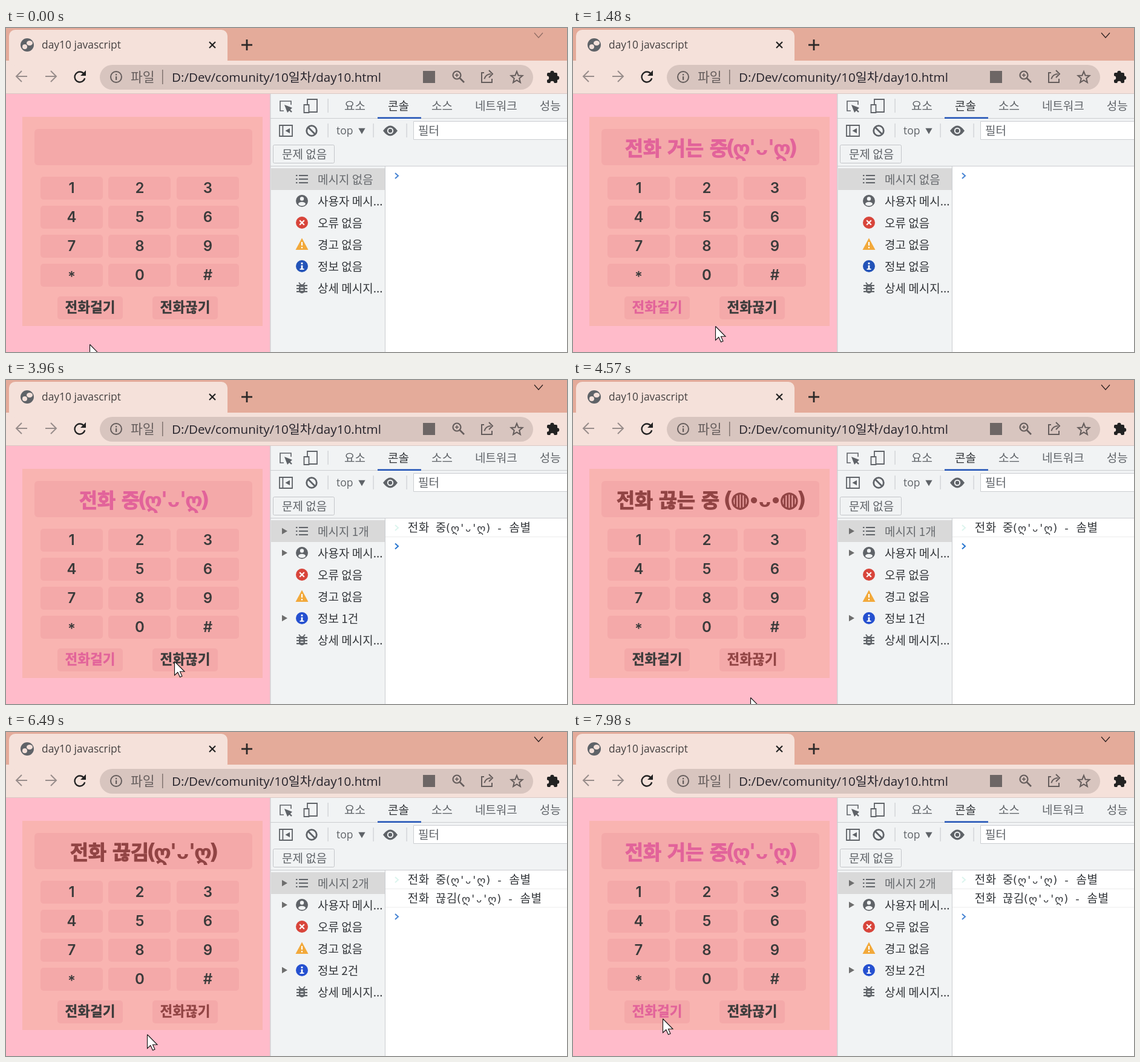
An HTML page with a canvas that plays this animation: 927 by 536 pixels, repeating every 8 s.

```html
<!DOCTYPE html>
<html lang="ko">
<head>
<meta charset="utf-8">
<title>day10 javascript</title>
<style>
html, body { margin: 0; width: 100%; height: 100%; overflow: hidden; background: #ffbbca; }
canvas { display: block; }
</style>
</head>
<body>
<canvas id="stage" width="927" height="536"></canvas>
<script>
const c = document.getElementById('stage').getContext('2d');
const LOOP = 8000, STEP = 70, TAU = Math.PI * 2;
const KR = '"Noto Sans CJK KR", "Noto Sans CJK", sans-serif';
const UI = '"Open Sans", ' + KR;
const SYMBOL = '"DejaVu Sans", sans-serif';
const BAR = '#f5e1da', PANEL = '#f1f3f4', RULE = '#cbcdd1', PAD = '#f4a9a9';
const GREY = '#5f6368', SOFT = '#655d5c', INK = '#33363a', KEY = '#3b3b3b';
const PINK = '#e2639a', RED = '#914444';

// Timeline in ms
const PRESS_CALL = 490, PRESS_END = 4030, PRESS_AGAIN = 7850;
const LOG_TIMES = [2540, 6110];
const LOGS = ["전화 중(ღ'ᴗ'ღ) - 솜별", "전화 끊김(ღ'ᴗ'ღ) - 솜별"];
const SCREENS = [
  { at: 540, color: PINK, text: "전화 거는 중(ღ'ᴗ'ღ)" },
  { at: 2540, color: PINK, text: "전화 중(ღ'ᴗ'ღ)" },
  { at: 4100, color: RED, text: '전화 끊는 중 (◍•ᴗ•◍)' },
  { at: 6110, color: RED, text: "전화 끊김(ღ'ᴗ'ღ)" },
  { at: 7910, color: PINK, text: "전화 거는 중(ღ'ᴗ'ღ)" }
];
const MOVES = [
  { from: 70, to: 210, x: 134, y: 449 },
  { from: 1340, to: 1480, x: 235, y: 493 },
  { from: 3290, to: 4030, x: 285, y: 461 },
  { from: 4100, to: 4290, x: 294, y: 525 },
  { from: 4570, to: 5250, x: 281, y: 527 },
  { from: 5450, to: 5930, x: 263, y: 511 },
  { from: 6000, to: 6490, x: 233, y: 500 },
  { from: 6960, to: 7230, x: 155, y: 484 },
  { from: 7300, to: 7980, x: 147, y: 473 }
];

function box(x, y, w, h, color, r = 0) {
  c.fillStyle = color;
  c.beginPath();
  c.roundRect(x, y, w, h, r);
  c.fill();
}

function frame(x, y, w, h, color, lw = 1, r = 0) {
  c.strokeStyle = color;
  c.lineWidth = lw;
  c.beginPath();
  c.roundRect(x, y, w, h, r);
  c.stroke();
}

function trace(p) {
  c.beginPath();
  for (let i = 0; i < p.length; i += 2) c.lineTo(p[i], p[i + 1]);
}

function line(color, lw, ...p) {
  trace(p);
  c.strokeStyle = color;
  c.lineWidth = lw;
  c.stroke();
}

function poly(color, ...p) {
  trace(p);
  c.closePath();
  c.fillStyle = color;
  c.fill();
}

function disc(x, y, r, color, ry = r) {
  c.beginPath();
  c.ellipse(x, y, r, ry, 0, 0, TAU);
  c.fillStyle = color;
  c.fill();
}

function ring(x, y, r, color, lw, from = 0, to = TAU) {
  c.beginPath();
  c.arc(x, y, r, from, to);
  c.strokeStyle = color;
  c.lineWidth = lw;
  c.stroke();
}

// Open angle with its tip at x, y
function angle(x, y, dx, dy, color, lw) {
  line(color, lw, x - dx, y - dy, x, y, x - dx, y + dy);
}

function arrow(x, y, dir, color) {
  line(color, 2, x - 9 * dir, y, x + 9 * dir, y);
  angle(x + 9 * dir, y, 9 * dir, 9, color, 2);
}

function triangle(x, y, r, turn, color) {
  const p = [];
  for (let i = 0; i < 3; i++) p.push(x + r * Math.cos(turn + i * TAU / 3), y + r * Math.sin(turn + i * TAU / 3));
  poly(color, ...p);
}

function cross(x, y, r, color, lw) {
  line(color, lw, x - r, y - r, x + r, y + r);
  line(color, lw, x + r, y - r, x - r, y + r);
}

function plus(x, y, r, color, lw) {
  line(color, lw, x - r, y, x + r, y);
  line(color, lw, x, y - r, x, y + r);
}

function text(s, x, y, size, color, { font = UI, weight = 400, align = 'left', swell = 0 } = {}) {
  c.font = `${weight} ${size}px ${font}`;
  c.textAlign = align;
  c.fillStyle = color;
  c.fillText(s, x, y);
  if (swell) {
    c.strokeStyle = color;
    c.lineWidth = swell;
    c.lineJoin = 'round';
    c.strokeText(s, x, y);
    c.lineJoin = 'miter';
  }
}

// Mixed hangul and symbols, each character centred in its own advance
const ADVANCE = { '(': 9, ')': 9, 'ღ': 27, "'": 9, 'ᴗ': 22, '•': 14, '◍': 31, '-': 18 };
const BIG = { hangul: 30, space: 10, scale: 1, size: 33, bold: true };
const SMALL = { hangul: 18, space: 10, scale: 0.645, size: 19, bold: false };

function advance(ch, style) {
  if (ch === ' ') return style.space;
  return ch in ADVANCE ? ADVANCE[ch] * style.scale : style.hangul;
}

function mixedWidth(s, style) {
  return [...s].reduce((sum, ch) => sum + advance(ch, style), 0);
}

function mixed(s, x, y, color, style) {
  for (const ch of s) {
    const w = advance(ch, style), cx = x + w / 2;
    if (ch in ADVANCE) {
      const size = ('ᴗ•'.includes(ch) ? 29 : 36) * style.scale * (style.bold ? 1 : 0.77);
      const drop = ch === 'ღ' ? 2 * style.scale : 0;
      text(ch, cx, y + drop, size, color, { font: SYMBOL, weight: style.bold ? 700 : 400, align: 'center', swell: ch === '◍' ? 1.2 : 0 });
    } else {
      text(ch, cx, y + 0.5, style.size, color, { font: KR, weight: style.bold ? 900 : 400, align: 'center', swell: style.bold ? 1 : 0 });
    }
    x += w;
  }
}

function tabStrip(t) {
  box(0, 0, 927, 54, '#e4ab9a');
  box(0, 54, 927, 55, BAR);
  box(5, 3, 361, 60, BAR, 10);
  disc(35, 28, 11, GREY);
  disc(31, 31, 4, BAR);
  disc(39, 25, 5, BAR, 4);
  text('day10 javascript', 59, 34, 17.4, '#454141');
  cross(341, 28, 5, '#222', 2.2);
  plus(398, 28, 9, '#2b2828', 2.8);
  line(t < PRESS_CALL ? '#8f6c64' : '#2a2020', 1.2, 873, 8, 880, 16, 887, 8);
}

function star(x, y, color) {
  const p = [];
  for (let i = 0; i <= 11; i++) {
    const a = i * TAU / 10 - TAU / 4, r = i % 2 ? 4.4 : 10;
    p.push(x + r * Math.cos(a), y + r * Math.sin(a));
  }
  line(color, 2, ...p);
}

function toolbar() {
  arrow(26, 80, -1, '#988d8b');
  arrow(74, 80, 1, '#988d8b');
  ring(122, 81, 8.5, '#222', 2.4, 0.25, TAU - 0.75);
  poly('#222', 132, 70, 132, 79, 123, 79);

  box(155, 61, 716, 41, '#d8c5bf', 20.5);
  ring(182, 81, 9, SOFT, 2);
  box(181, 80, 2.2, 6, SOFT);
  box(181, 76, 2.2, 2.3, SOFT);
  text('파일', 206, 89, 21.5, SOFT, { font: KR });
  box(258, 69, 1.5, 24, '#80736f');
  text('D:/Dev/comunity/10일차/day10.html', 274, 89, 20.6, '#25222a');

  box(689, 71, 20, 20, '#6d6665');
  ring(745, 78, 6.5, SOFT, 2.2);
  line(SOFT, 2.6, 750, 83, 757, 90);
  plus(745, 78, 3, SOFT, 1.6);
  line(SOFT, 2, 790, 74, 786, 74, 786, 90, 803, 90, 803, 84);
  ring(801, 87, 11, SOFT, 2, TAU * 0.54, TAU * 0.75);
  angle(804, 76, 6, 6, SOFT, 2);
  star(844, 82, SOFT);

  box(894, 74, 17, 17, '#222', 2);
  for (const turn of [0, 1, 2, 3]) {
    const a = turn * TAU / 4;
    disc(902.5 + 8.5 * Math.cos(a), 82.5 - 8.5 * Math.sin(a), 3.2, turn < 2 ? '#222' : BAR);
  }
}

function phone(t) {
  const screen = SCREENS.findLast(s => t >= s.at);
  const ending = t >= PRESS_END && t < PRESS_AGAIN;
  const calling = t >= PRESS_CALL && !ending;
  box(0, 109, 437, 427, '#ffbbca');
  box(27, 147, 397, 346, '#f9b4b1');
  box(47, 167, 360, 60, PAD, 6);
  if (screen) mixed(screen.text, 227 - mixedWidth(screen.text, BIG) / 2, 210, screen.color, BIG);

  [...'123456789*0#'].forEach((k, i) => {
    const x = 57 + (i % 3) * 112.5, y = 246 + Math.floor(i / 3) * 48;
    box(Math.floor(x), y, 103, 38, PAD, 5);
    text(k, x + 51.5, y + (k === '*' ? 30 : 27), 24, KEY, { font: 'Inter, sans-serif', weight: 600, align: 'center' });
  });

  const buttons = [['전화걸기', calling ? PINK : KEY], ['전화끊기', ending ? RED : KEY]];
  buttons.forEach(([s, color], i) => {
    const x = 85 + i * 157;
    box(x, 444, 108, 38, PAD, 5);
    text(s, x + 54, 469.5, 22.5, color, { font: KR, weight: 700, align: 'center', swell: 0.4 });
  });
}

function panelBars() {
  box(437, 109, 490, 427, PANEL);
  box(436, 109, 1.5, 427, '#d3cdd1');
  for (const y of [149, 228]) box(437, y, 490, 1, RULE);
  box(0, 108, 927, 1, '#d9c9c5');

  line(GREY, 1.6, 471, 127, 471, 121, 453, 121, 453, 137, 459, 137);
  poly(GREY, 460, 127, 473, 132, 465, 140);
  line(GREY, 2.4, 466, 133, 472, 139);
  frame(498, 118, 16, 21, GREY, 1.8);
  box(491, 126, 10, 15, PANEL);
  frame(492.5, 127, 8, 13, GREY, 1.8);
  box(531.5, 117, 1.2, 23, RULE);

  let x = 559;
  for (const s of ['요소', '콘솔', '소스', '네트워크', '성능']) {
    text(s, x, 135.5, 19, s === '콘솔' ? INK : GREY, { font: KR });
    x += c.measureText(s).width + 37;
  }
  box(614, 147.5, 72, 2.5, '#1f51b5');

  frame(452, 161, 21, 18, GREY, 1.8);
  box(456.5, 161, 1.8, 18, GREY);
  triangle(466.5, 170, 5, TAU / 2, GREY);
  ring(505, 170, 8.3, GREY, 2.8);
  line(GREY, 2.8, 499, 164, 511, 176);
  text('top', 546, 176, 17.5, GREY);
  triangle(588, 169, 6.5, TAU / 4, GREY);
  c.beginPath();
  c.moveTo(623, 170);
  c.quadraticCurveTo(635, 153, 647, 170);
  c.quadraticCurveTo(635, 187, 623, 170);
  c.fill();
  disc(635, 170, 5.2, PANEL);
  disc(635, 170, 3.2, GREY);
  for (const x of [531.5, 606.5, 661.5]) box(x, 158, 1.2, 23, RULE);
  box(673, 154.5, 260, 30, '#fff');
  frame(673.5, 154.5, 260, 30, RULE);
  text('필터', 681, 176.5, 19, GREY, { font: KR });
  frame(441.5, 193.5, 101, 30, '#c3c5c9', 1, 2);
  text('문제 없음', 456, 215.5, 19, GREY, { font: KR });
}

// Icons are drawn around 0, 0
const ICONS = [
  () => {
    for (const y of [-6, 0, 6]) {
      box(-10, y - 1, 2.5, 2, GREY);
      box(-5, y - 1, 15, 2, GREY);
    }
  },
  () => {
    disc(0, 0, 10, GREY);
    disc(0, -3.5, 3.2, PANEL);
    disc(0, 5, 6, PANEL, 3.2);
  },
  () => {
    disc(0, 0, 10, '#d8453b');
    cross(0, 0, 3.8, '#fff', 2.2);
  },
  () => {
    poly('#f2a93b', 0, -10.5, 10.5, 9, -10.5, 9);
    box(-1.1, -4, 2.2, 6, '#fff');
    box(-1.1, 4, 2.2, 2.4, '#fff');
  },
  n => {
    disc(0, 0, 10, n ? '#2550d0' : '#2353b8');
    box(-1.4, -6, 2.8, 2.8, '#fff');
    box(-1.4, -1.5, 2.8, 7, '#fff');
    box(-3.5, 4, 7, 1.8, '#fff');
  },
  () => {
    box(-5, -6, 10, 15, GREY, 5);
    for (const y of [-4, 1, 6]) box(-9, y - 1, 18, 2.2, GREY);
    for (const side of [-1, 1]) line(GREY, 2, side * 5, -9, side * 2, -5);
    for (const y of [-1.5, 3]) box(-2.5, y, 5, 1.7, PANEL);
  }
];

function sidebar(n) {
  box(438, 232, 188, 36, '#d9d9d9');
  const labels = [n ? `메시지 ${n}개` : '메시지 없음', '사용자 메시...', '오류 없음', '경고 없음', n ? `정보 ${n}건` : '정보 없음', '상세 메시지...'];
  labels.forEach((s, i) => {
    const y = 250 + i * 36, filled = n && [0, 1, 4].includes(i);
    text(s, 515, y + 7.5, 19, i ? INK : '#66696d', { font: KR });
    if (filled) triangle(459, y, 6, 0, '#6e6e6e');
    c.save();
    c.translate(489, y);
    ICONS[i](n);
    c.restore();
  });
}

function consoleLog(n) {
  box(626, 229, 301, 307, '#fff');
  box(626, 229, 1, 307, RULE);
  for (let i = 0; i < n; i++) {
    mixed(LOGS[i], 663.5, 250.5 + i * 31, INK, SMALL);
    box(627, 259 + i * 30.5, 300, 1, '#ededed');
  }
  if (n) angle(648, 244.5, 5, 4.5, '#dcf5ee', 2.1);
  angle(648, 244.5 + n * 30.5, 5, 4.5, n === 1 ? '#2b78d0' : '#4a86d4', 2.1);
}

// The pointer advances in even steps from one resting place to the next
function cursorAt(t) {
  let x = 138, y = 523;
  for (const m of MOVES) {
    if (t < m.from) break;
    const step = Math.floor((t - m.from + 12) / STEP) + 1;
    const u = Math.min(1, step * STEP / (m.to - m.from + STEP));
    x += (m.x - x) * u;
    y += (m.y - y) * u;
  }
  return [Math.round(x), Math.round(y)];
}

function cursor(t) {
  const [x, y] = cursorAt(t);
  const outline = [0, 0, 0, 23, 5.3, 18, 9, 26, 12.5, 24.5, 9, 16.8, 16.5, 16.8];
  c.save();
  c.translate(x + 0.5, y + 0.5);
  poly('#fff', ...outline);
  line('#111', 1.1, ...outline, 0, 0);
  c.restore();
}

function draw(t) {
  const logs = LOG_TIMES.filter(at => t >= at).length;
  tabStrip(t);
  toolbar();
  phone(t);
  panelBars();
  sidebar(logs);
  consoleLog(logs);
  cursor(t);
}

const begin = performance.now();
function tick() {
  draw((performance.now() - begin) % LOOP);
  requestAnimationFrame(tick);
}
tick();
</script>
</body>
</html>
```
